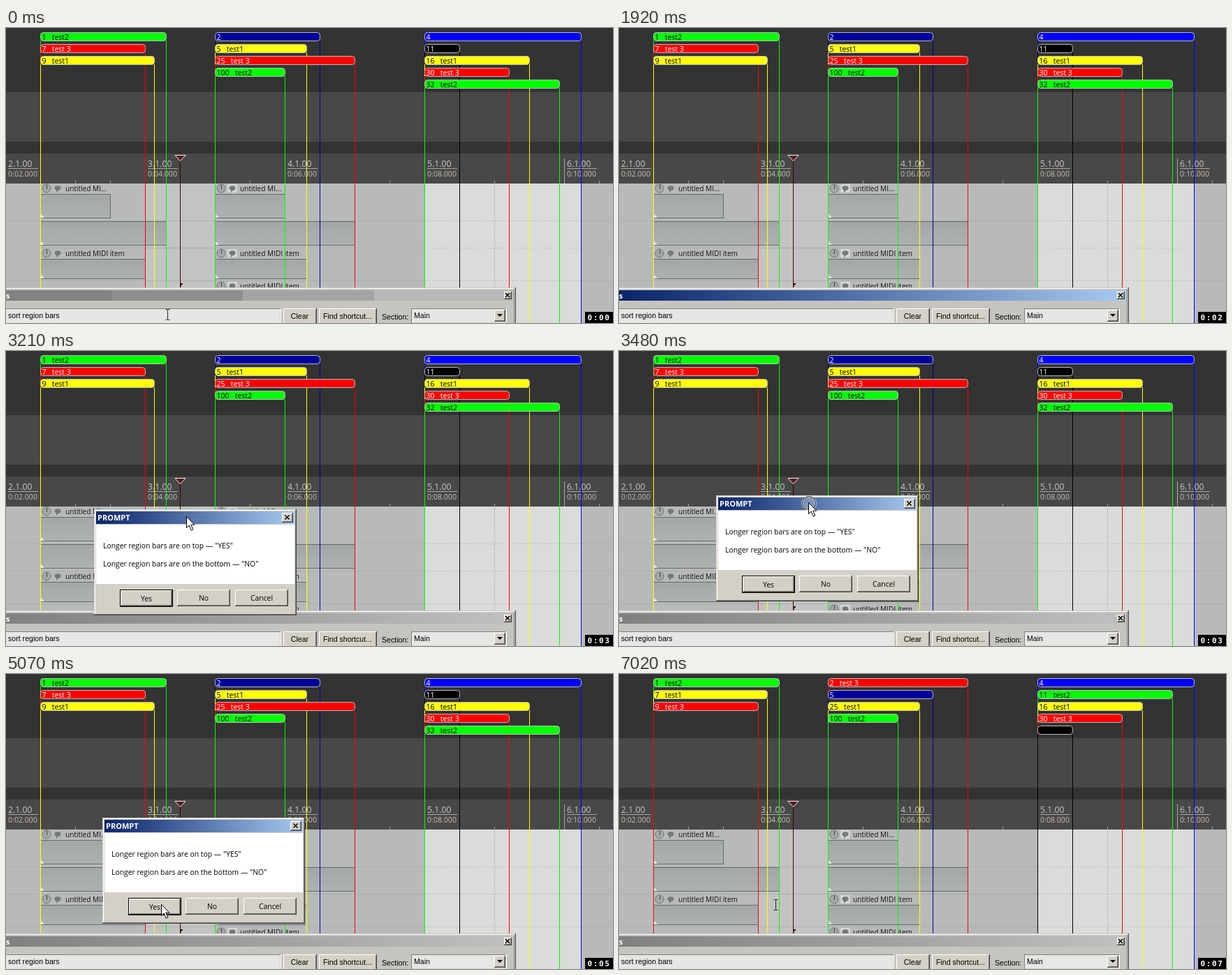
An HTML page that plays this animation: 869 px wide and 423 px high, repeating every 8000 ms.

```html
<!DOCTYPE html>
<html lang="en">
<head>
<meta charset="utf-8">
<title>Sorting region bars</title>
<style>
  html, body { margin: 0; width: 100%; height: 100%; overflow: hidden; background: #333; }
  svg { display: block; width: 869px; height: 423px; }
  text { white-space: pre; }
  .ui { font-family: "Liberation Sans", sans-serif; font-size: 10.6px; }
  .dlg { font-family: "Open Sans", sans-serif; font-size: 10.4px; }
  .item { font-family: "Open Sans", sans-serif; font-size: 10.1px; fill: #111; }
  .bar { font-family: "Open Sans", sans-serif; font-size: 10.5px; }
  .beat { font-family: "Open Sans", sans-serif; font-size: 12.2px; fill: #c6c8ca; }
  .time { font-family: "Open Sans", sans-serif; font-size: 10.6px; fill: #cabfb2; }
  .cap { font-family: "Open Sans", sans-serif; font-size: 11px; font-weight: 700; fill: #fff; }
  .clock { font-family: "DejaVu Sans Mono", monospace; font-size: 11px; font-weight: 700; letter-spacing: 1.6px; fill: #fff; }
  .mid { text-anchor: middle; }
</style>
</head>
<body>
<svg id="stage" viewBox="0 0 869 423" xmlns="http://www.w3.org/2000/svg"></svg>
<script>
const rect = (x, y, w, h, fill, more = '') =>
  `<rect x="${x}" y="${y}" width="${w}" height="${h}" fill="${fill}" ${more}/>`;
const vline = (x, y1, y2, fill) => rect(x, y1, 1, y2 - y1, fill);
const text = (x, y, cls, str, more = '') => `<text x="${x}" y="${y}" class="${cls}" ${more}>${str}</text>`;
const path = (d, fill, more = '') => `<path d="${d}" fill="${fill}" ${more}/>`;
const group = (id, body) => `<g id="${id}">${body}</g>`;

const FACE = '#d4d0c8', PANEL = '#c6c4bf', FIELD = '#e6e7e5';

// Two-pixel raised or sunken box
function bevel(x, y, w, h, face = FACE, sunk = false) {
  const [tl, br, inner] = sunk ? ['#808080', '#fff', FACE] : ['#fff', '#404040', '#808080'];
  return rect(x, y, w, h, br) + rect(x, y, w - 1, h - 1, tl) +
    rect(x + 1, y + 1, w - 2, h - 2, inner) + rect(x + 1, y + 1, w - 3, h - 3, face);
}
const button = (x, y, w, h, label) =>
  bevel(x, y, w, h) + text(x + w / 2, y + h / 2 + 4, 'dlg mid', label);
const closeBox = (x, y, w, h) => {
  const cx = x + w / 2 - .5, cy = y + h / 2 - .5;
  return bevel(x, y, w, h) +
    path(`M${cx - 3} ${cy - 3}l6 6m0-6l-6 6`, 'none', 'stroke="#000" stroke-width="1.5"');
};

// --- background, ruler and grid ---
function backdrop() {
  let s = rect(0, 0, 869, 423, '#333') + rect(0, 92, 869, 71, '#484848') + rect(0, 180, 869, 43, '#484848') +
    rect(0, 223, 869, 200, '#b8baba') + rect(200, 223, 100, 200, '#c2c4c3') +
    rect(599, 223, 225, 200, '#dadcda');
  for (const y of [276, 315, 362])
    s += `<path d="M0 ${y + .5}H599M824 ${y + .5}H869" stroke="#aeb0b0"/>` +
      `<path d="M600 ${y + .5}H823" stroke="#c2c4c2" stroke-dasharray="3 2"/>`;
  s += '<path d="M699.5 223V423" stroke="#8a8c8a" stroke-dasharray="1 2"/>';
  for (let x = 49; x < 869; x += 50) s += vline(x, 219, 223, '#a0a0a0');
  for (let i = 0; i < 5; i++) {
    const x = i * 200;
    s += vline(x - 1, 187, 223, '#a8a8a8') + rect(x + 3, 201, 43, 1, '#a8a8a8') +
      text(x + 3, 199, 'beat', `${i + 2}.1.00`) + text(x + 3, 212.5, 'time', `0:${String(2 + 2 * i).padStart(2, 0)}.000`);
  }
  return s;
}

// --- media items ---
const header = (x, y, label, lit) =>
  `<circle cx="${x + 9}" cy="${y}" r="6" fill="#a4a8a8" stroke="#707474"/>` + vline(x + 9, y - 5, y + 1, '#444') +
  (lit ? rect(x + 18, y - 6, 14, 12, '#d4d6d6', 'rx="2"') : '') +
  `<ellipse cx="${x + 25}" cy="${y - .5}" rx="4.5" ry="3.3" fill="#757979"/>` +
  path(`M${x + 23} ${y + 1}v5l4-4z`, '#757979') + text(x + 36, y + 4, 'item', label);
const clip = (x, y, end, h) =>
  rect(x + .5, y + .5, end - x, h, 'url(#clip)', 'stroke="#666a6a"') +
  path(`M${x + 1} ${y + h - 5}v5h5z`, '#eee');

function items() {
  const column = (x, ends, lit) =>
    header(x, 230, 'untitled MI...', lit) + clip(x, 238, ends[0], 34) + clip(x, 277, ends[1], 34) +
    header(x, 323, 'untitled MIDI item', lit) + clip(x, 331, ends[2], 28);
  return column(49, [149, 229, 199], false) + column(299, [399, 499, 430], true) +
    header(299, 370, 'untitled MIDI item', true);
}

// --- regions: [last pixel, fill, name] ---
const GREEN = '#0f0', RED = '#f00', YELLOW = '#ff0', NAVY = '#00009c', BLUE = '#00f', BLACK = '#000';
const columns = [
  { x: 49, ids: [1, 7, 9], bars: [
    [229, GREEN, 'test2'], [199, RED, 'test 3'], [212, YELLOW, 'test1']] },
  { x: 299, ids: [2, 5, 25, 100], bars: [
    [449, NAVY, ''], [430, YELLOW, 'test1'], [499, RED, 'test 3'], [399, GREEN, 'test2']] },
  { x: 599, ids: [4, 11, 16, 30, 32], bars: [
    [823, BLUE, ''], [649, BLACK, ''], [749, YELLOW, 'test1'], [720, RED, 'test 3'], [792, GREEN, 'test2']] }
];

// Every region drops a line in its own colour from both ends
function regions(sorted) {
  let lines = '', bars = '';
  for (const { x, ids, bars: list } of columns) {
    const order = sorted ? [...list].sort((a, b) => b[0] - a[0]) : list;
    order.forEach(([end, fill, name], row) => {
      const y = 6 + 17 * row;
      const dark = fill !== GREEN && fill !== YELLOW;
      const label = sorted && fill === BLACK ? '' : `${ids[row]}   ${name}`;
      lines += vline(x, y + 12, 423, fill) + vline(end, y + 12, 423, fill);
      bars += rect(x + .5, y + .5, end - x, 12, fill, 'rx="4" stroke="#bbb"') +
        text(x + 2.5, y + 10.5, 'bar', label, `fill="${dark ? '#fff' : '#000'}"`);
    });
  }
  return lines + bars;
}

const playhead = vline(249, 190, 372, '#400000') +
  path('M242 182.5H257L249.5 190.5Z', '#5a1818', 'stroke="#eee"') + path('M249 366h4v2h-2v3h-2z', '#400000');

// --- search window at the bottom ---
const titleBar = (id, fill) => group(id, rect(0, 376, 726, 15, fill));
function searchWindow() {
  const bands = [[0, '#828282'], [151, '#8e8e8e'], [339, '#a4a4a4'], [527, '#b8b8b8']];
  return rect(0, 372, 730, 51, '#404040') + rect(0, 372, 729, 51, PANEL) + rect(0, 373, 728, 50, '#fff') +
    rect(0, 374, 728, 49, '#808080') + rect(0, 374, 727, 49, PANEL) +
    group('titleBands', bands.map(([x, c]) => rect(x, 376, 726 - x, 15, c)).join('')) +
    titleBar('titleActive', 'url(#active)') + titleBar('titleIdle', 'url(#idle)') +
    text(0, 388, 'cap', 's') + closeBox(713, 378, 11, 11) +
    bevel(-2, 402, 396, 24, FIELD, true) + text(3, 416, 'ui', 'sort region bars') +
    bevel(397, 402, 48, 24) + text(420.5, 417, 'ui mid', 'Clear') +
    bevel(448, 402, 83, 24) + text(489, 417, 'ui mid', 'Find shortcut...') +
    text(538, 418, 'ui', 'Section:') +
    bevel(580, 402, 137, 22, FIELD, true) + text(584, 416, 'ui', 'Main') +
    bevel(699, 404, 16, 17) + path('M703 410h8l-4 4z', '#000');
}

// --- prompt, drawn from its own corner ---
function prompt() {
  return rect(0, 0, 290, 152, '#404040') + rect(0, 0, 289, 151, FACE) + rect(1, 1, 288, 150, '#808080') +
    rect(1, 1, 287, 149, '#fff') + rect(2, 2, 286, 148, FACE) +
    rect(3, 3, 284, 18, 'url(#active)') + text(5, 16, 'cap', 'PROMPT') + closeBox(269, 5, 16, 14) +
    rect(3, 22, 284, 85, '#fff') +
    text(13, 56, 'dlg', 'Longer region bars are on top — "YES"') +
    text(13, 82, 'dlg', 'Longer region bars are on the bottom — "NO"') +
    rect(37, 115, 76, 25, '#000') + button(38, 116, 74, 23, 'Yes') +
    group('pressed', rect(38.5, 116.5, 73, 22, FACE, 'stroke="#808080"') +
      rect(41.5, 119.5, 67, 16, 'none', 'stroke="#000" stroke-dasharray="1 1"') + text(76, 132.5, 'dlg mid', 'Yes')) +
    button(119, 115, 76, 24, 'No') + button(202, 115, 76, 24, 'Cancel');
}

const ring = '<circle cx="1" cy="1" r="9.5" fill="#fff" fill-opacity=".25" stroke="#fff" stroke-width="2.4"/>' +
  '<circle cx="1" cy="1" r="9.5" fill="none" stroke="#222" stroke-width="1.2"/>';
const arrow = path('M.5.5V16.5L4.3 13L7.3 20.2L9.8 19L6.9 12.2H11.8Z', '#fff', 'stroke="#000"');
const beam = path('M-3-7.5h2.5l.5.5.5-.5H3M0-7V7M-3 7.5h2.5l.5-.5.5.5H3', 'none', 'stroke="#222"');

const gradient = (id, a, b, dir = 'x2="1"') =>
  `<linearGradient id="${id}" x1="0" y1="0" ${dir}><stop stop-color="${a}"/><stop offset="1" stop-color="${b}"/></linearGradient>`;

document.getElementById('stage').innerHTML =
  `<defs>${gradient('active', '#0a246a', '#a6caf0')}${gradient('idle', '#808080', '#c0c0c0')}${gradient('clip', '#a3a7a7', '#adb1b1', 'x2="0" y2="1"')}</defs>` +
  backdrop() + items() + group('before', regions(false)) + group('after', regions(true)) + playhead +
  searchWindow() + group('prompt', prompt()) +
  group('pointer', group('ring', ring) + group('arrow', arrow) + group('beam', beam)) +
  rect(829, 407, 40, 16, '#000') + text(832.5, 418.5, 'clock', '0:00', 'id="clock"');

// --- timeline: each step changes part of the state at once ---
const LOOP = 8000;
const start = { title: 'titleBands', cursor: 'beam', at: [231.5, 411], box: null, ring: false, pressed: false, sorted: false };
const steps = [
  [120, { cursor: '' }],
  [1800, { title: 'titleActive' }],
  [2070, { title: 'titleIdle', box: [126, 227] }],
  [2600, { cursor: 'arrow', at: [218, 388] }],
  [2750, { at: [224, 365] }],
  [2870, { at: [236, 320] }],
  [2990, { at: [247, 280] }],
  [3100, { at: [254, 252] }],
  [3210, { at: [258, 237] }],
  [3360, { ring: true }],
  [3480, { at: [271, 217], box: [139, 207] }],
  [3600, { at: [270, 216], box: [138, 206] }],
  [3750, { ring: false }],
  [3900, { at: [243, 277] }],
  [4010, { at: [232, 300] }],
  [4120, { at: [227, 312] }],
  [4270, { at: [222, 328] }],
  [4420, { at: [222, 330] }],
  [5500, { ring: true, pressed: true }],
  [6620, { ring: false, pressed: false, box: null, sorted: true, cursor: 'beam', at: [224.5, 331] }]
];
const seconds = [960, 1920, 2990, 4010, 5070, 6060, 7020];

const $ = id => document.getElementById(id);
const show = (id, on) => { $(id).style.display = on ? '' : 'none'; };
const move = (id, [x, y]) => $(id).setAttribute('transform', `translate(${x} ${y})`);

function draw(t) {
  const s = Object.assign({}, start, ...steps.filter(k => k[0] <= t).map(k => k[1]));
  for (const id of ['titleBands', 'titleActive', 'titleIdle']) show(id, s.title === id);
  for (const id of ['arrow', 'beam']) show(id, s.cursor === id);
  show('ring', s.ring);
  show('pressed', s.pressed);
  show('before', !s.sorted);
  show('after', s.sorted);
  show('prompt', s.box);
  if (s.box) move('prompt', s.box);
  move('pointer', s.at);
  $('clock').textContent = `0:0${seconds.filter(k => k <= t).length}`;
}

const t0 = performance.now();
function tick() {
  draw((performance.now() - t0) % LOOP);
  requestAnimationFrame(tick);
}
tick();
</script>
</body>
</html>
```
